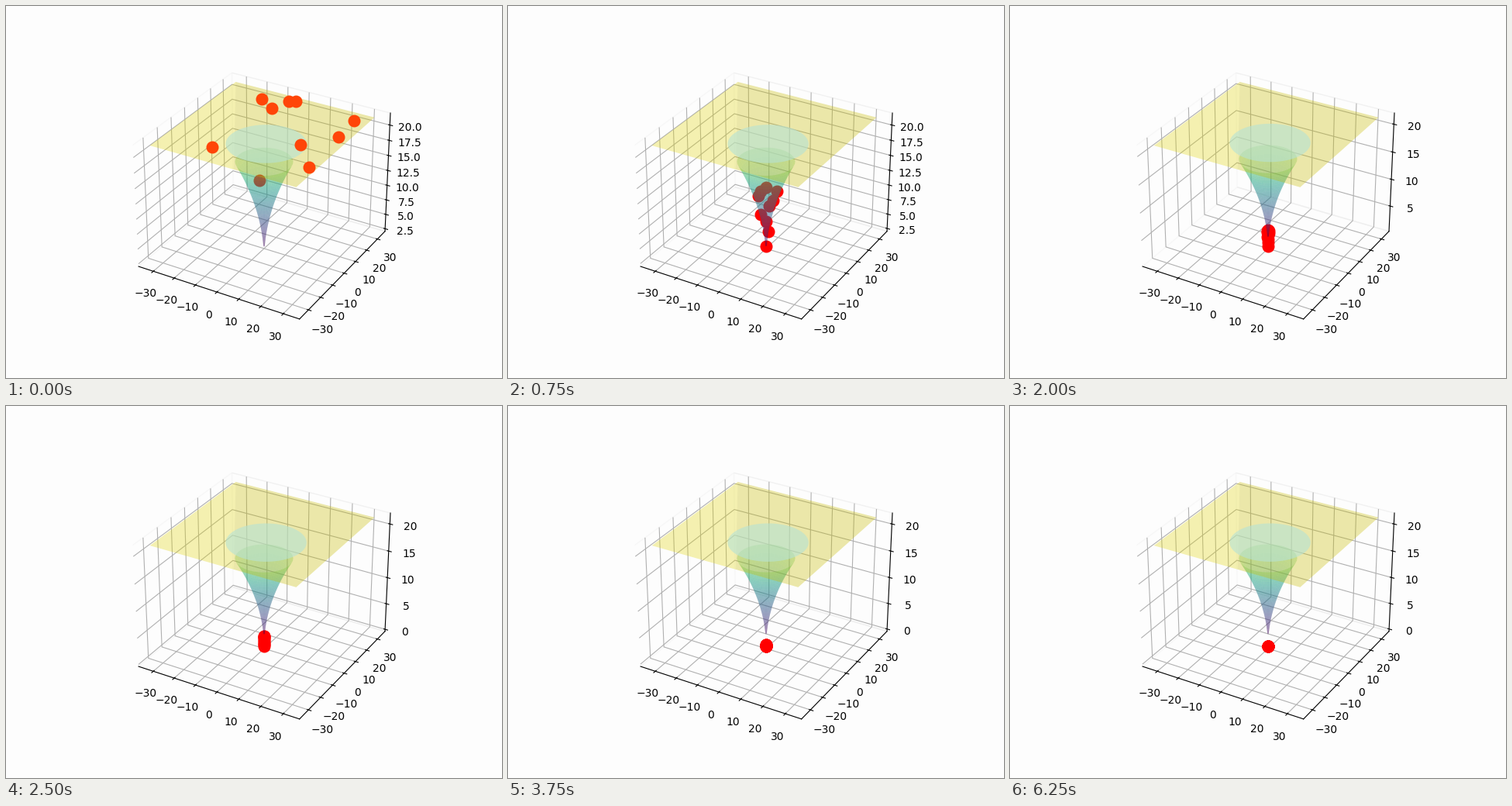
Animation of 640x480 px, one loop 8000 ms. Source, as a matplotlib script:

```python
import numpy as np
import matplotlib.pyplot as plt
from matplotlib.animation import FuncAnimation
from mpl_toolkits.mplot3d.art3d import Poly3DCollection

STEPS, INTERVAL = 32, 250
BACK = "#fdfdfd"
HALF = 32.4      # half width of the sheet
TOP = 21.55      # height of the sheet
RIM = 16         # radius where the well begins
K = 4.9          # well depth: z = K * sqrt(r)
TIP = 0.25       # radius of the funnel's lower end
CAUGHT = 3       # step at which every ball is inside the well

# Key points: where the balls lie at first, as (right, toward viewer).
START = np.array([(-1, -28), (36, -9), (-20, 13), (3, -20), (29, 5),
                  (17, 29), (14, 11), (13, -26), (10, -26), (-2, -6)])
INDEX = np.arange(len(START))
SHARE = np.sqrt(1 - (INDEX / INDEX[-1]) ** 2)
ANGLE = np.radians(60) * np.sin(1.8 * INDEX)


def well(r):
    return K * np.sqrt(r)


def spiral(step):
    """Balls in the well, spread between a shrinking outer and inner radius."""
    m = step - CAUGHT
    outer = np.log(5.35) - 0.38 * m - 0.016 * m ** 2
    inner = np.log(0.24) - 0.3 * max(0, m - 2) ** 2
    r = np.exp(inner + SHARE * (outer - inner))
    return np.column_stack([r * np.sin(ANGLE), -r * np.cos(ANGLE)])


def balls(step):
    """Return x, y, z and radius of every ball."""
    uv = spiral(max(step, CAUGHT))
    if step < CAUGHT:
        uv += (START - uv) * (1 - step / CAUGHT) ** 3.5
    u, v = uv.T
    c, s = np.cos(np.pi / 6), 0.5
    r = np.hypot(u, v)
    return c * u + s * v, s * u - c * v, np.where(r > RIM, TOP, well(r)), r


def add_flat(x, y, z, color, alpha, zorder):
    verts = np.column_stack([x, y, np.full(len(x), z)])
    poly = Poly3DCollection([verts], facecolors=[(*color, alpha)],
                            linewidths=0, zorder=zorder)
    ax.add_collection3d(poly)


def add_balls(color, zorder):
    return ax.plot([], [], [], "o", color=color, markersize=10,
                   markeredgewidth=1.5, zorder=zorder)[0]


def padded(lo, hi):
    pad = (hi - lo) / 48
    return lo - pad, hi + pad


fig = plt.figure(figsize=(6.4, 4.8), dpi=100, facecolor=BACK)
ax = fig.add_subplot(projection="3d", computed_zorder=False, facecolor=BACK)
ax.view_init(elev=30, azim=-60)
for axis in (ax.xaxis, ax.yaxis, ax.zaxis):
    axis.pane.set_fill(False)

inside = add_balls("red", 1)

r, a = np.meshgrid(np.linspace(np.sqrt(TIP), np.sqrt(11.6), 24) ** 2,
                   np.linspace(0, 2 * np.pi, 37))
ax.plot_surface(r * np.cos(a), r * np.sin(a), well(r), cmap="viridis",
                vmin=2, vmax=21, alpha=0.32, rstride=1, cstride=1,
                linewidth=0, antialiased=True, zorder=2)

# Sheet, with the part in front of the back wall slightly darker.
side = HALF * np.array([-1, 1, 1, -1])
depth = HALF * np.array([1, 1, -1, -1])
add_flat(side, depth, TOP, (0.88, 0.83, 0), 0.3, 3)
wall = HALF * np.array([-1, 1, 1, 0.17])
add_flat(wall, depth, TOP, (0, 0, 0), 0.035, 3)

t = np.linspace(0, 2 * np.pi, 80)
add_flat(RIM * np.cos(t) + 0.7, RIM * np.sin(t) + 0.4, well(RIM),
         (0.71, 0.89, 0.84), 0.6, 4)

on_sheet = add_balls((1, 0.27, 0.03), 5)


def update(step):
    x, y, z, r = balls(step)
    for line, mask in ((inside, r <= RIM), (on_sheet, r > RIM)):
        line.set_data_3d(x[mask], y[mask], z[mask])

    low = min(well(TIP), z.min())
    if low > 1.7:
        ticks = np.arange(2.5, 21, 2.5)
        labels = [f"{v:.1f}" for v in ticks]
    else:
        ticks = np.arange(0, 21, 5)
        labels = [f"{v:d}" for v in ticks]
    # A tick below the lowest ball's margin would stretch the axis.
    bottom, top = padded(low, TOP)
    shown = [i for i, v in enumerate(ticks) if v >= bottom]
    ax.set_zticks(ticks[shown], [labels[i] for i in shown])
    ax.set_xticks(range(-30, 31, 10))
    ax.set_yticks(range(-30, 31, 10))
    ax.set_xlim(*padded(-1.1 * HALF, 1.1 * HALF))
    ax.set_ylim(*padded(-1.1 * HALF, 1.1 * HALF))
    ax.set_zlim(bottom, top)
    return inside, on_sheet


anim = FuncAnimation(fig, update, frames=STEPS, interval=INTERVAL,
                     repeat=True, repeat_delay=0, blit=False)
plt.show()
```
